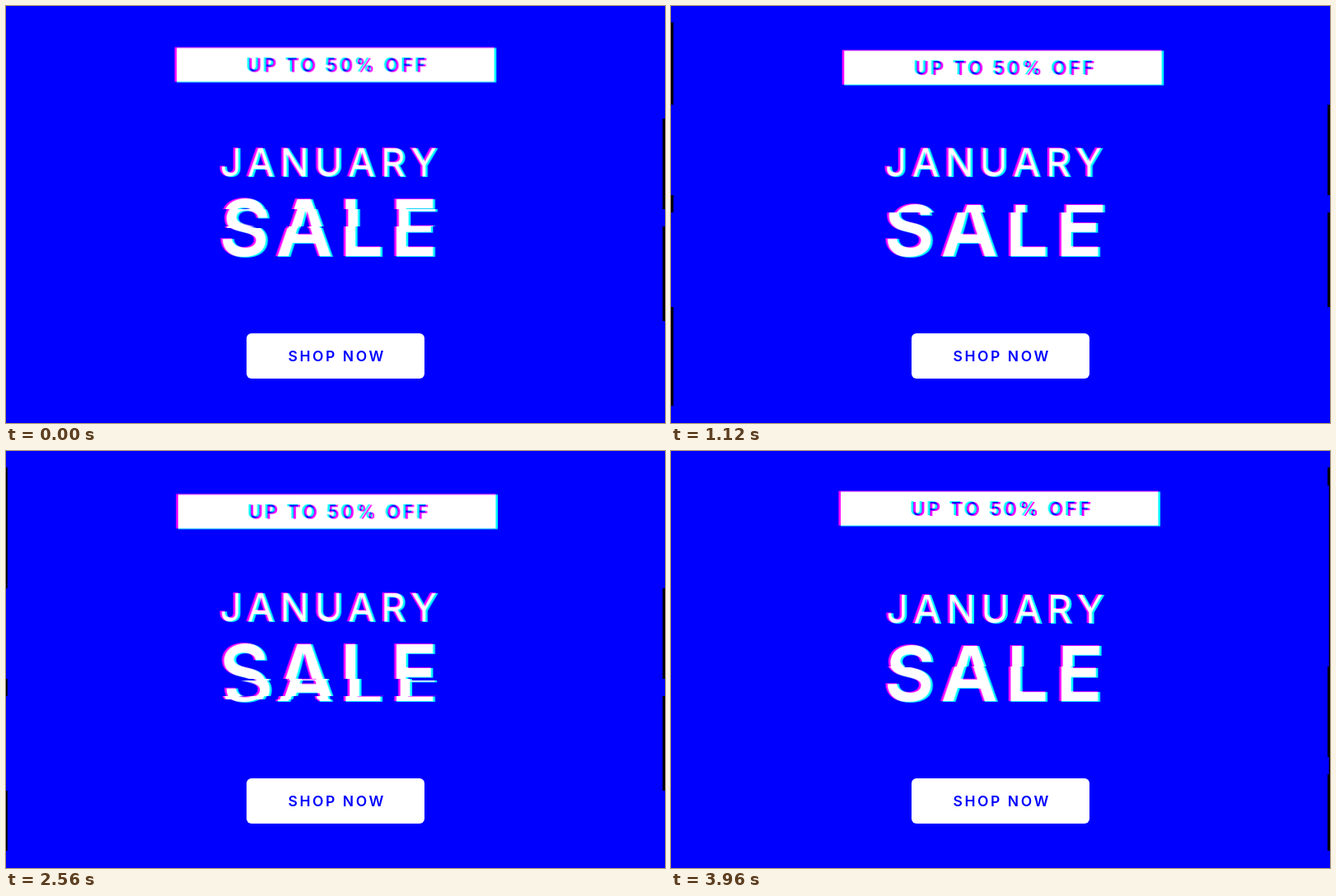
An HTML page with a canvas for the animation above (4 s loop, 800 by 507 pixels).

```html
<!DOCTYPE html>
<html lang="en">
<head>
<meta charset="utf-8">
<title>January sale</title>
<style>
  html, body { margin: 0; width: 100%; height: 100%; overflow: hidden; background: #00f; }
  canvas { display: block; }
</style>
</head>
<body>
<canvas id="stage" width="800" height="507"></canvas>
<script>
const W = 800, H = 507, LOOP = 4000;
const TOP = 20, BOTTOM = 486, PERIOD = BOTTOM - TOP;
const SPEED = 11.19;                       // px per step
const SECOND_STARTS = [190, 97, 43, 49];   // band position at the start of each second
const SHIFT_X = 3, SHIFT_Y = 3.5;
const FRINGE_X = 1.3, FRINGE_Y = 0.4;
const ctx = document.getElementById('stage').getContext('2d');

// Places text by the left edge of its ink and its baseline.
function text(c, str, x, y, size, weight, tracking) {
  c.font = `${weight} ${size}px Inter, sans-serif`;
  c.letterSpacing = tracking + 'px';
  c.fillText(str, x + c.measureText(str).actualBoundingBoxLeft, y);
}

// One colour channel of the artwork.
function artwork(color) {
  const canvas = document.createElement('canvas');
  canvas.width = W;
  canvas.height = H;
  const c = canvas.getContext('2d');
  c.fillStyle = color;
  c.fillRect(206, 50.5, 388, 42);
  c.globalCompositeOperation = 'destination-out';
  text(c, 'UP TO 50% OFF', 293.5, 80, 22.5, 600, 3.6);
  c.globalCompositeOperation = 'source-over';
  text(c, 'JANUARY', 263, 211, 48, 600, 5.6);
  text(c, 'SALE', 264.5, 307.5, 96.5, 700, 6.8);
  return canvas;
}

const red = artwork('#f00'), green = artwork('#0f0');

// Shift from -1 to 1 at a height within the repeating bands.
function bandShift(y, { pos, swing }) {
  const v = (y - TOP - pos + 2 * PERIOD) % PERIOD;
  return v < 110 || (v >= 131 && v < 246) ? -1 : swing;
}

// The sideways bands fill TOP to BOTTOM; the vertical ones span the stage.
function rowShift(y, state) {
  return {
    dx: y < TOP || y >= BOTTOM ? 0 : SHIFT_X * bandShift(y, state),
    dy: SHIFT_Y * bandShift(TOP + y * PERIOD / H, state)
  };
}

function drawStrip(y, end, dx, dy) {
  ctx.save();
  ctx.beginPath();
  ctx.rect(0, y, W, end - y);
  ctx.clip();
  ctx.fillStyle = '#000';
  ctx.fillRect(0, y, W, end - y);
  ctx.fillStyle = '#00f';
  ctx.fillRect(dx, y, W, end - y);
  ctx.globalCompositeOperation = 'lighter';
  ctx.drawImage(red, dx - FRINGE_X, dy - FRINGE_Y);
  ctx.drawImage(green, dx + FRINGE_X, dy + FRINGE_Y);
  ctx.restore();
}

// Band position and swing; steps last 40, 40, 40 and 80 ms in turn.
function pose(t) {
  if (t < 40) return { pos: 137 - TOP, swing: 0 };
  const u = t - 40;
  const step = Math.floor(u / 200) * 4 + Math.min(3, Math.floor(u % 200 / 40));
  const local = step % 20;
  return {
    pos: SECOND_STARTS[Math.floor(step / 20)] + SPEED * local - TOP,
    swing: 1 - 1.42 * (local / 19) ** 2.3
  };
}

function draw(t) {
  const state = pose(t);
  let from = 0, run = rowShift(0, state);
  for (let y = 1; y <= H; y++) {
    const next = rowShift(y, state);
    if (y < H && next.dx === run.dx && next.dy === run.dy) continue;
    drawStrip(from, y, run.dx, run.dy);
    from = y;
    run = next;
  }
  ctx.fillStyle = '#fff';
  ctx.beginPath();
  ctx.roundRect(292, 398, 216, 55, 6);
  ctx.fill();
  ctx.fillStyle = '#00f';
  text(ctx, 'SHOP NOW', 342.5, 432, 17.5, 600, 2.55);
}

const start = performance.now();
function tick() {
  draw((performance.now() - start) % LOOP);
  requestAnimationFrame(tick);
}
tick();
</script>
</body>
</html>
```
